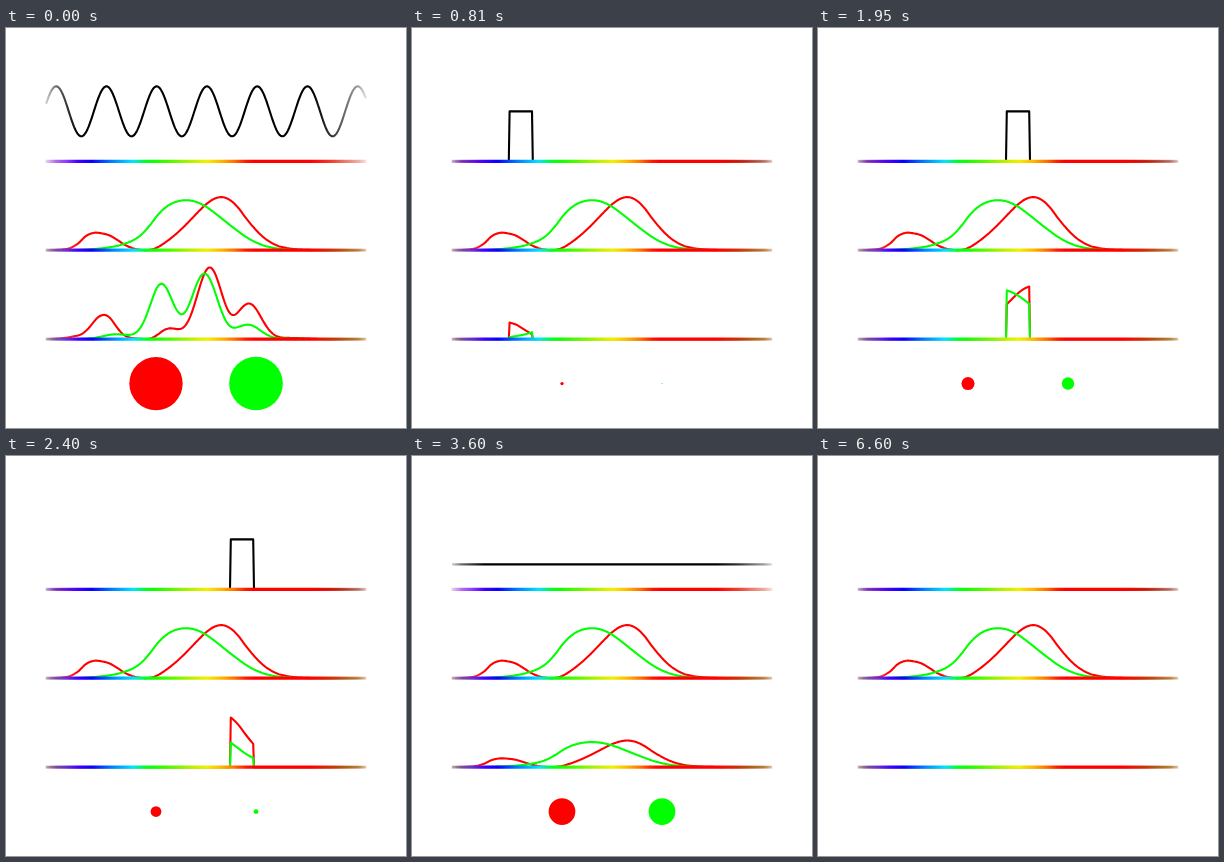
Animation of 400 by 400 pixels, one loop 8 s. Source, as an HTML page:

```html
<!DOCTYPE html>
<html lang="en">
<head>
<meta charset="utf-8">
<title>Light spectrum and eye response</title>
<style>
  html, body { margin: 0; width: 100%; height: 100%; overflow: hidden; background: #fff; }
  svg { display: block; width: 100%; height: 100%; }
  path { fill: none; stroke-width: 2.1; stroke-linejoin: round; }
  .base { stroke-width: 3.3; }
</style>
</head>
<body>
<svg id="stage" viewBox="0 0 400 400"></svg>
<script>
const STEP = 30, LOOP = 8000, MORPH = 20, SEGMENT = 100;
const FROM = 380, TO = 780, UNIT = 50;
const ROWS = [3, 5, 7].map(k => k * 400 / 9);

// Response in thousandths, every 10 nm from 380 nm.
const RED = [1, 4, 14, 44, 134, 284, 348, 336, 291, 195, 96, 32, 5, 9, 63, 166, 290, 433, 595,
  762, 916, 1026, 1062, 1003, 854, 642, 448, 284, 165, 87, 47, 23, 11, 6, 3, 1];
const GREEN = [0, 0, 0, 1, 4, 12, 23, 38, 60, 91, 139, 208, 323, 503, 710, 862, 954, 995, 995,
  952, 870, 757, 631, 503, 381, 265, 175, 107, 61, 32, 17, 8, 4, 2, 1];

// Opacity along x: both ends of the visible range fade out.
const FADE = [[39, .15], [50, .58], [72, 1], [305, 1], [326, .8], [340, .56], [352, .38], [361, .1]];
const HUES = [[39, '#8a00b8'], [60, '#7000ff'], [86, '#0800ff'], [106, '#0080ff'], [127, '#00e4ff'],
  [140, '#00ff20'], [148, '#10ff00'], [165, '#58f800'], [185, '#b8f000'], [201, '#f0f000'],
  [215, '#ffb800'], [228, '#ff7400'], [240, '#ff1800'], [248, '#ff0000'], [310, '#ff0000'], [345, '#d02000']];

const waves = Array.from({ length: TO - FROM + 1 }, (_, i) => FROM + i);
const xOf = w => 40 + (w - FROM) * 0.8;
const mix = (a, b, k) => a + (b - a) * k;
const stage = document.getElementById('stage');

function add(parent, tag, attrs) {
  const el = document.createElementNS('http://www.w3.org/2000/svg', tag);
  for (const key in attrs) el.setAttribute(key, attrs[key]);
  return parent.appendChild(el);
}

function fadeAt(x) {
  const i = FADE.findIndex(stop => stop[0] >= x);
  if (i < 1) return FADE[i < 0 ? FADE.length - 1 : 0][1];
  const [x0, a] = FADE[i - 1], [x1, b] = FADE[i];
  return mix(a, b, (x - x0) / (x1 - x0));
}

function gradient(id, hues) {
  const grad = add(stage, 'linearGradient',
    { id, gradientUnits: 'userSpaceOnUse', x1: 38, x2: 362, y1: 0, y2: 0 });
  const xs = [...new Set([...FADE, ...hues].map(stop => stop[0]))].sort((a, b) => a - b);
  for (const x of xs) {
    const i = Math.max(0, hues.findLastIndex(h => h[0] <= x));
    const next = hues[i + 1];
    const share = next ? Math.max(0, (x - hues[i][0]) / (next[0] - hues[i][0])) : 0;
    const color = next ? blend(hues[i][1], next[1], share) : hues[i][1];
    add(grad, 'stop', { offset: (x - 38) / 324, 'stop-color': color, 'stop-opacity': fadeAt(x) });
  }
  return `url(#${id})`;
}

function blend(a, b, k) {
  const part = (hex, i) => parseInt(hex.slice(i, i + 2), 16);
  return `rgb(${[1, 3, 5].map(i => Math.round(mix(part(a, i), part(b, i), k)))})`;
}

// Catmull-Rom through the samples.
function response(data) {
  const at = i => data[i] || 0;
  return waves.map(w => {
    const pos = (w - FROM) / 10, i = Math.floor(pos), t = pos - i;
    const [a, b, c, d] = [at(i - 1), at(i), at(i + 1), at(i + 2)];
    const v = b + t / 2 * (c - a + t * (2 * a - 5 * b + 4 * c - d + t * (3 * (b - c) + d - a)));
    return Math.max(0, v / 1000);
  });
}

function draw(path, values, row) {
  path.setAttribute('d', 'M' + values.map((v, i) =>
    xOf(waves[i]).toFixed(1) + ' ' + (ROWS[row] - v * UNIT).toFixed(2)).join('L'));
}

const black = gradient('black', [[39, '#000000']]);
const rainbow = gradient('rainbow', HUES);
const curve = stroke => add(stage, 'path', { stroke });

const light = curve(black);
const eyes = [['red', '#ff0000', RED, 150], ['green', '#00ff00', GREEN, 250]].map(([id, color, data, cx]) => {
  const stroke = gradient(id, [[39, color]]);
  const bars = response(data);
  draw(curve(stroke), bars, 1);
  return { bars, seen: curve(stroke), dot: add(stage, 'circle', { cx, cy: 8 * 400 / 9, fill: color }) };
});
for (const y of ROWS) add(stage, 'path', { class: 'base', stroke: rainbow, d: `M39.5 ${y}H360.5` });

const sine = w => 1 + Math.sin(w / 10) / 2;
const pulse = n => w => Math.abs(w - 385 - 3 * n) < 15 ? 1 : 0;
const flat = () => 0.5;
const dark = () => 0;

function spectrum(n) {
  const part = Math.max(0, Math.ceil(n / SEGMENT) - 1);
  const k = Math.min(1, (n - part * SEGMENT) / MORPH);
  const [before, after] = [[sine, pulse(n)], [pulse(SEGMENT), flat], [flat, dark]][part];
  return waves.map(w => mix(before(w), after(w), k));
}

function render(ms) {
  const values = spectrum(Math.floor((ms % LOOP) / STEP));
  draw(light, values, 0);
  for (const { bars, seen, dot } of eyes) {
    const product = values.map((v, i) => v * bars[i]);
    draw(seen, product, 2);
    dot.setAttribute('r', (product.reduce((a, b) => a + b, 0) / 4).toFixed(2));
  }
}

const start = performance.now();
function tick() {
  render(performance.now() - start);
  requestAnimationFrame(tick);
}
tick();
</script>
</body>
</html>
```
